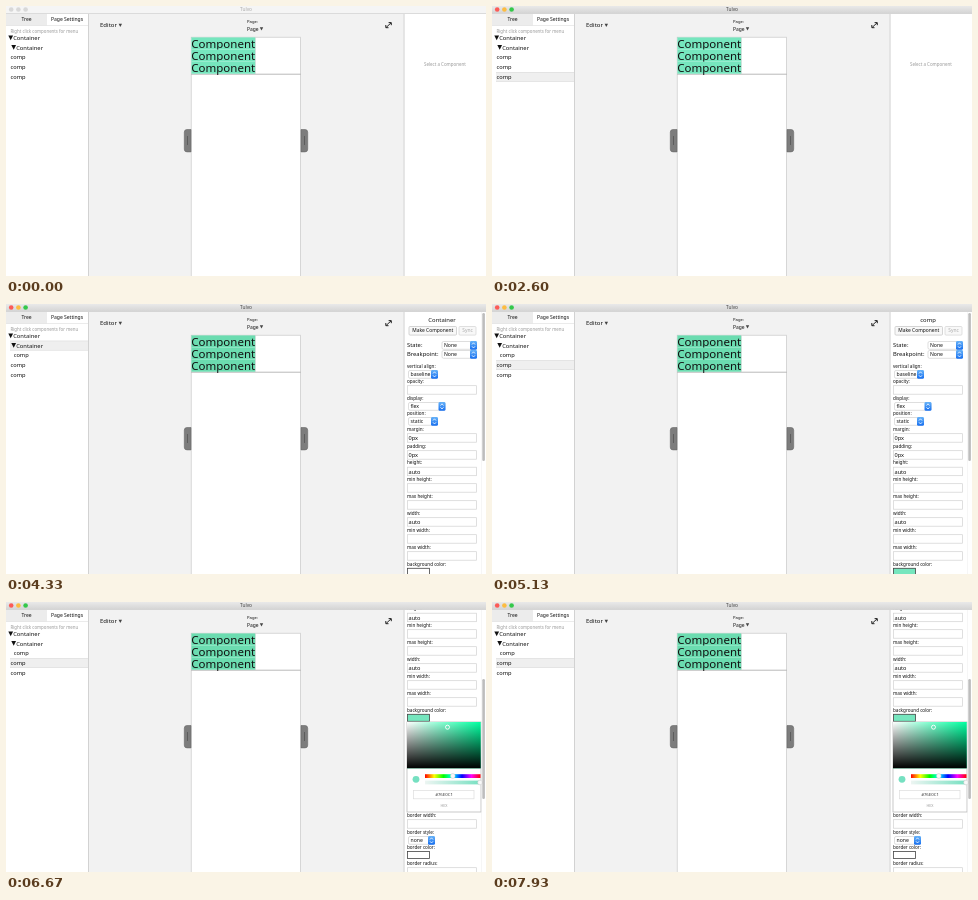
Animation, 480 px wide and 270 px high, one loop 8000 ms. Source, as an HTML page:

```html
<!DOCTYPE html>
<html lang="en">
<head>
<meta charset="utf-8">
<title>Component editor</title>
<style>
html, body { margin: 0; width: 100%; height: 100%; overflow: hidden; background: #fff; }
svg { display: block; width: 100vw; height: 100vh; font-family: "Noto Sans", "Open Sans", sans-serif; }
</style>
</head>
<body>
<svg id="stage" viewBox="0 0 480 270"></svg>
<script>
const LOOP = 8000;
const ACTIVATE = 900, HOVER = 1400, DROP = 2800, SELECT_CONTAINER = 3270,
      SELECT_COMP = 4870, SCROLL_START = 5470, SCROLL_END = 5710, OPEN_PICKER = 6470;
const SCROLL = 152, PICKER_SHIFT = 90;
const MINT = '#76e6be';

const rect = (x, y, w, h, fill, extra = '') =>
  `<rect x="${x}" y="${y}" width="${w}" height="${h}" fill="${fill}" ${extra}/>`;
const box = (x, y, w, h, fill = '#fff', stroke = '#d2d2d2', r = 0) =>
  rect(x + .5, y + .5, w - 1, h - 1, fill, `stroke="${stroke}" stroke-width=".7" rx="${r}"`);
// y is the vertical centre of the capitals
const text = (s, x, y, size, fill = '#111', anchor = 'start') =>
  `<text x="${x}" y="${y + size * .36}" font-size="${size}" fill="${fill}" text-anchor="${anchor}">${s}</text>`;
const circle = (x, y, r, fill, extra = '') =>
  `<circle cx="${x}" cy="${y}" r="${r}" fill="${fill}" ${extra}/>`;
const path = (d, fill, extra = '') => `<path d="${d}" fill="${fill}" ${extra}/>`;
const triangle = (x, y, w, fill = '#111') => path(`M${x} ${y - w / 2}h${w}l${-w / 2} ${w * .95}z`, fill);
const group = (id, content, extra = '') => `<g id="${id}" ${extra}>${content}</g>`;
const gradient = (id, colors, vertical) =>
  `<linearGradient id="${id}" ${vertical ? 'x2="0" y2="1"' : ''}>` +
  colors.map((c, i) => `<stop offset="${i / (colors.length - 1)}" stop-color="${c}"/>`).join('') +
  '</linearGradient>';

const label = (s, y) => text(s, 401, y, 4.6);
const input = (y, value = '') => box(401, y, 70, 9.5) + text(value, 402.5, y + 4.8, 5.6);
function select(x, y, w, value) {
  const s = x + w - 7, m = s + 3.5;
  return box(x, y, w, 8.8, '#fff', '#d0d0d0', 1.5) + text(value, x + 2.5, y + 4.2, 5.1) +
    rect(s, y, 7, 8.8, 'url(#blue)', 'rx="1.4"') +
    path(`M${m - 1.5} ${y + 3.5}l1.5 -1.7l1.5 1.7M${m - 1.5} ${y + 5.3}l1.5 1.7l1.5 -1.7`, 'none',
      'stroke="#fff" stroke-width=".8"');
}
const field = (name, y, value) => label(name, y) + input(y + 4.2, value);
const choice = (name, y, w, value) => label(name, y) + select(402, y + 4, w, value);
const swatch = (id, y, fill) =>
  `<rect id="${id}" x="401.5" y="${y}" width="22" height="7" fill="${fill}" stroke="#444" stroke-width=".8"/>`;

function titleBar() {
  const lights = (colors) => colors.map((c, i) => circle(5.2 + i * 7.2, 3.5, 2.3, c)).join('');
  const name = (fill) => text('Tulvo', 240, 3.6, 4.8, fill, 'middle');
  return rect(0, 0, 480, 7.5, '#f5f5f5') + lights(['#d8d8d8', '#d8d8d8', '#d8d8d8']) + name('#aaa') +
    group('activeBar', rect(0, 0, 480, 7.5, 'url(#bar)') + lights(['#fc5b57', '#fdbc40', '#34c84a']) + name('#444')) +
    rect(0, 7.2, 480, .7, '#cfcfcf');
}

function treePanel() {
  return rect(0, 8, 82, 262, '#fff') + rect(0, 8, 41, 11.5, '#ececec') +
    rect(0, 19.3, 82, .6, '#dedede') +
    text('Tree', 20.5, 13.6, 5, '#111', 'middle') + text('Page Settings', 45, 13.6, 5) +
    text('Right click components for menu', 4.5, 25, 4.36, '#999') +
    group('rowMark', rect(4, 0, 78, 9.7, '#efefef') + rect(4, 0, 78, .6, '#dcdcdc') + rect(4, 9.2, 78, .6, '#dcdcdc')) +
    triangle(2.3, 32, 4.8) + text('Container', 7.2, 32, 5.8) +
    triangle(5.3, 41.5, 4.8) + text('Container', 10.2, 41.5, 5.8) +
    group('nestedComp', text('comp', 4.5, 51, 5.7)) +
    text('comp', 4.5, 60.8, 5.7) + text('comp', 4.5, 70.5, 5.7) +
    rect(82, 8, .9, 262, '#cdcdcd');
}

function workspace() {
  const handle = (x, d, grip) => path(d, '#7d7d7d', 'stroke="#686868" stroke-width=".6"') +
    rect(grip, 130, .8, 9, '#555');
  let page = box(184.7, 30.7, 110.3, 250, '#fff', '#c8c8c8') + rect(185, 67.7, 110, 1, '#b9b9b9') +
    rect(249.3, 31.5, .6, 36.5, '#d0d0d0');
  for (let i = 0; i < 3; i++)
    page += rect(185.4, 31.4 + i * 12.1, 63.8, 12.1, MINT, 'class="block"') +
      text('Component', 185.3, 38 + i * 12, 11.5);
  return rect(82.8, 8, 315, 262, '#f2f2f2') +
    text('Editor', 94, 19.2, 6.05) + triangle(112.6, 19.5, 3.4, '#444') +
    text('Page:', 241, 15, 4.2) + text('Page', 241, 23, 4.9) + triangle(253.8, 23, 3.4, '#444') +
    path('M380.2 21.4L385 16.9M382.6 16.6h2.7v2.6M379.8 19v2.7h2.7', 'none', 'stroke="#222" stroke-width="1"') +
    page +
    handle(178, 'M185 123.5h-4q-2.7 0 -2.7 2.7v17q0 2.7 2.7 2.7h4z', 181.2) +
    handle(295, 'M295 123.5h4q2.7 0 2.7 2.7v17q0 2.7 -2.7 2.7h-4z', 298);
}

function picker() {
  const ring = 'stroke="#fff" stroke-width=".9"';
  return group('picker',
    rect(401, 272, 74, 90, '#fff', 'stroke="#bbb" stroke-width=".8"') +
    ['#00ffa0', 'url(#white)', 'url(#black)'].map(f => rect(401, 272, 73.7, 46.3, f)).join('') +
    circle(441.5, 277.2, 2, 'none', ring) +
    circle(410, 329.3, 3.4, '#76e0c1') +
    rect(419, 324.2, 55.5, 3.8, 'url(#hue)') + rect(419, 330.6, 55.5, 3.8, 'url(#alpha)') +
    circle(446.8, 326, 2.4, '#f8f8f8', 'stroke="#bbb" stroke-width=".4"') +
    circle(474, 332.5, 2.4, '#f8f8f8', 'stroke="#bbb" stroke-width=".4"') +
    box(407, 340, 61.5, 9.3, '#fff', '#ddd') + text('#76E0C1', 438, 344.7, 4.3, '#333', 'middle') +
    text('HEX', 438, 355.6, 3.7, '#999', 'middle'));
}

function properties() {
  const top =
    `<text id="heading" x="436" y="18.2" font-size="5.9" text-anchor="middle" fill="#111"></text>` +
    box(402.5, 22, 48.5, 9.6, '#f8f8f8', '#c4c4c4', 1) + text('Make Component', 426.8, 26.7, 4.9, '#111', 'middle') +
    box(452.5, 22, 18, 9.6, '#f8f8f8', '#d4d4d4', 1) + text('Sync', 461.5, 26.7, 4.9, '#aaa', 'middle') +
    text('State:', 401, 41, 5.8) + select(435.5, 37, 35.5, 'None') +
    text('Breakpoint:', 401, 50, 5.8) + select(435.5, 46, 35.5, 'None') +
    choice('vertical align:', 62, 30, 'baseline') + field('opacity:', 77) +
    choice('display:', 94, 37.5, 'flex') + choice('position:', 109, 30, 'static') +
    field('margin:', 125, '0px') + field('padding:', 142, '0px') +
    field('height:', 158.5, 'auto') + field('min height:', 175) + field('max height:', 192) +
    field('width:', 209, 'auto') + field('min width:', 226) + field('max width:', 243) +
    label('background color:', 260) + swatch('background', 264.3, '#fff');
  const lower =
    field('border width:', 275) + choice('border style:', 292, 27, 'none') +
    label('border color:', 307.3) + swatch('border', 311.5, '#fff') +
    field('border radius:', 323) + label('text:', 339) +
    box(401, 343, 68.5, 62.5, '#fff', '#aaa') + text('Component', 402.5, 347.6, 5.6) +
    choice('font family:', 410, 45, 'Arial');
  return rect(398, 8, 82, 262, '#fff') + rect(397.6, 8, .9, 262, '#cdcdcd') +
    group('hint', text('Select a Component', 418, 58.7, 4.45, '#999')) +
    group('panel', group('content', top + group('lower', lower) + picker()) +
      rect(475.4, 8, .5, 262, '#ececec') +
      '<rect id="thumb" x="476.3" width="2.6" rx="1.3" fill="#bdbdbd"/>', 'clip-path="url(#panelClip)"');
}

const stage = document.getElementById('stage');
stage.innerHTML = '<defs>' +
  gradient('bar', ['#e9e9e9', '#d4d4d4'], true) + gradient('blue', ['#66b2f8', '#176ff0'], true) +
  gradient('white', ['#fff', '#fff0']) + gradient('black', ['#0000', '#000'], true) +
  gradient('hue', ['#f00', '#ff0', '#0f0', '#0ff', '#00f', '#f0f', '#f00']) +
  gradient('alpha', ['#edf5f2', '#76e0c1']) +
  `<clipPath id="panelClip">${rect(398, 7.5, 82, 263, '#fff')}</clipPath></defs>` +
  workspace() + treePanel() + properties() + titleBar();

const get = (id) => document.getElementById(id);
const show = (id, on) => get(id).setAttribute('display', on ? 'inline' : 'none');
const move = (id, x, y) => get(id).setAttribute('transform', `translate(${x} ${y})`);
const blocks = document.querySelectorAll('.block');

function draw(t) {
  const open = t >= OPEN_PICKER;
  const compSelected = t >= SELECT_COMP;
  const p = Math.min(1, Math.max(0, (t - SCROLL_START) / (SCROLL_END - SCROLL_START)));
  const scroll = SCROLL * p * p * (3 - 2 * p);

  show('activeBar', t >= ACTIVATE);
  show('rowMark', t >= HOVER && t < DROP || t >= SELECT_CONTAINER);
  move('rowMark', 0, compSelected ? 56.2 : t >= SELECT_CONTAINER ? 36.7 : 66);
  move('nestedComp', t >= DROP ? 3.2 : 0, 0);
  blocks.forEach(b => b.setAttribute('fill', t >= SELECT_CONTAINER ? '#6bdcb0' : MINT));

  show('hint', t < SELECT_CONTAINER);
  show('panel', t >= SELECT_CONTAINER);
  show('picker', open);
  get('heading').textContent = compSelected ? 'comp' : 'Container';
  get('background').setAttribute('fill', compSelected ? MINT : '#fff');
  move('content', 0, -scroll);
  move('lower', 0, open ? PICKER_SHIFT : 0);
  get('thumb').setAttribute('y', 9 + scroll / SCROLL * (open ? 68 : 81));
  get('thumb').setAttribute('height', open ? 120 : 148);
}

function tick() {
  draw(performance.now() % LOOP);
  requestAnimationFrame(tick);
}
tick();
</script>
</body>
</html>
```
